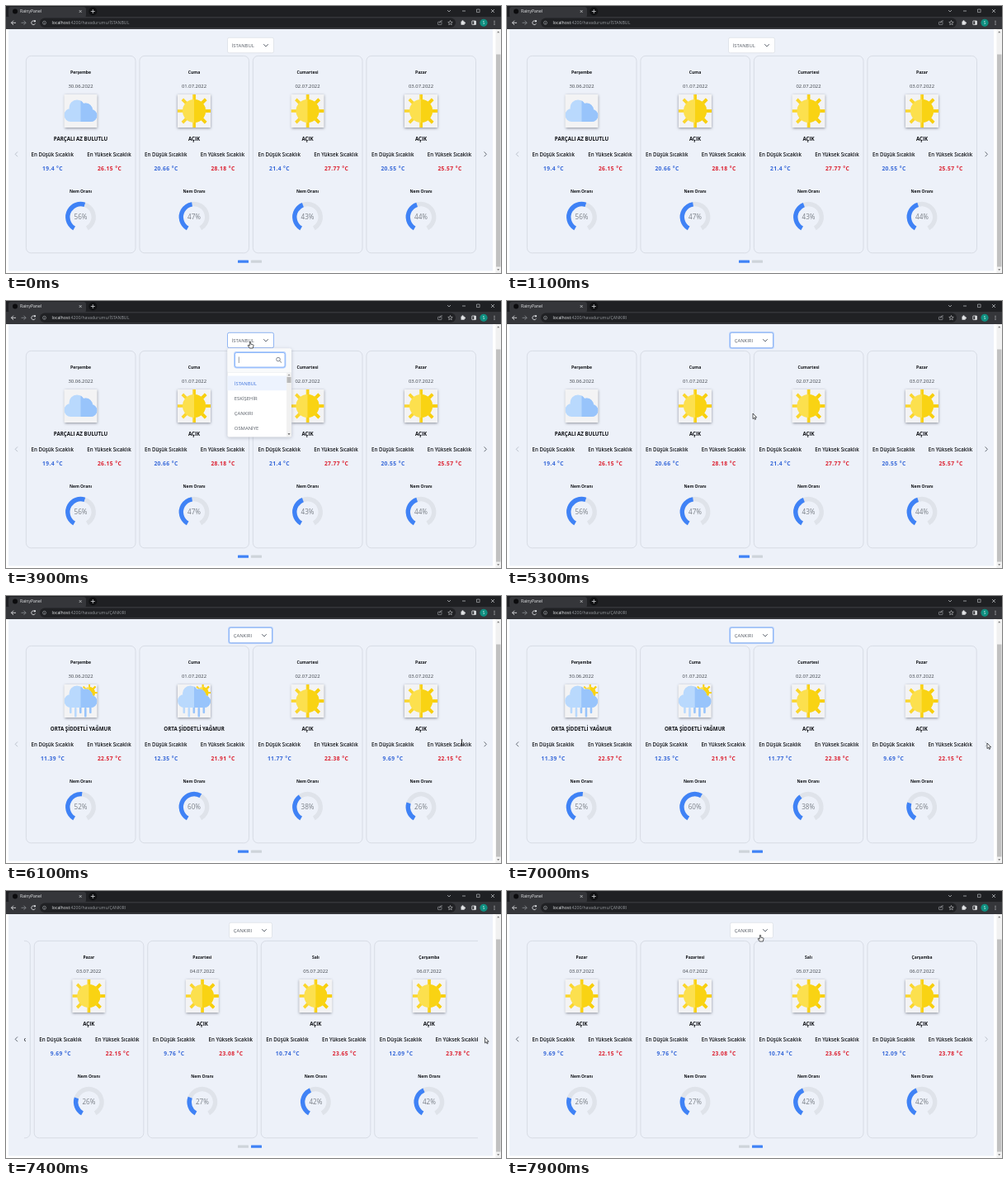
Animation of 600 by 323 pixels, one loop 8 s. Source, as an HTML page with a canvas:

```html
<!DOCTYPE html>
<html lang="tr">
<head>
<meta charset="utf-8">
<title>RainyPanel</title>
<style>
html, body { margin: 0; width: 100%; height: 100%; overflow: hidden; background: #fff; }
canvas { display: block; width: 600px; height: 323px; }
</style>
</head>
<body>
<canvas id="stage"></canvas>
<script>
const W = 600, H = 323, LOOP = 8000;
const OPEN = 3780, PICK = 4900, LOADED = 5400, NEXT = 7000;
const FONT = '"Open Sans", "Noto Sans", sans-serif';
const BLUE = '#3f82f6', PAGE = '#edf1f9', INK = '#101216';
const STEP = 137.5;

const canvas = document.getElementById('stage');
const c = canvas.getContext('2d');
const dpr = window.devicePixelRatio || 1;
canvas.width = W * dpr;
canvas.height = H * dpr;

const days = ['Perşembe', 'Cuma', 'Cumartesi', 'Pazar', 'Pazartesi', 'Salı', 'Çarşamba'];
const dates = ['30.06', '01.07', '02.07', '03.07', '04.07', '05.07', '06.07'];
const labels = { cloud: 'PARÇALI AZ BULUTLU', sun: 'AÇIK', rain: 'ORTA ŞİDDETLİ YAĞMUR' };
const forecasts = {
  'İSTANBUL': [
    ['cloud', 19.4, 26.15, 56], ['sun', 20.66, 28.18, 47],
    ['sun', 21.4, 27.77, 43], ['sun', 20.55, 25.57, 44]
  ],
  'ÇANKIRI': [
    ['rain', 11.39, 22.57, 52], ['rain', 12.35, 21.91, 60], ['sun', 11.77, 22.38, 38],
    ['sun', 9.69, 22.15, 26], ['sun', 9.76, 23.08, 27], ['sun', 10.74, 23.65, 42],
    ['sun', 12.09, 23.78, 42]
  ]
};

const clamp = v => Math.max(0, Math.min(1, v));
const ramp = (t, from, length) => clamp((t - from) / length);
const smooth = u => u * u * (3 - 2 * u);
const easeOut = u => 1 - Math.pow(1 - u, 2.3);

// CSS "ease": cubic-bezier(.25, .1, .25, 1)
function cssEase(x) {
  const curve = (s, a, b) => 3 * a * s * (1 - s) ** 2 + 3 * b * s * s * (1 - s) + s ** 3;
  let lo = 0, hi = 1;
  for (let i = 0; i < 20; i++) {
    const mid = (lo + hi) / 2;
    if (curve(mid, .25, .25) < x) lo = mid; else hi = mid;
  }
  return curve(lo, .1, 1);
}

function rect(x, y, w, h, fill, r = 0) {
  c.fillStyle = fill;
  c.beginPath();
  c.roundRect(x, y, w, h, r);
  c.fill();
}

function frame(x, y, w, h, color, width, r) {
  c.strokeStyle = color;
  c.lineWidth = width;
  c.beginPath();
  c.roundRect(x, y, w, h, r);
  c.stroke();
}

function disc(x, y, r, fill) {
  c.fillStyle = fill;
  c.beginPath();
  c.arc(x, y, r, 0, Math.PI * 2);
  c.fill();
}

function ring(x, y, r, color, width, from = 0, to = Math.PI * 2) {
  c.strokeStyle = color;
  c.lineWidth = width;
  c.beginPath();
  c.arc(x, y, r, from, to);
  c.stroke();
}

function line(color, width, ...pts) {
  c.strokeStyle = color;
  c.lineWidth = width;
  c.beginPath();
  for (let i = 0; i < pts.length; i += 2) c.lineTo(pts[i], pts[i + 1]);
  c.stroke();
}

// y is the middle of the capitals
function text(str, x, y, size, color, align = 'center', weight = 400, spacing = 0) {
  c.font = `${weight} ${size}px ${FONT}`;
  c.letterSpacing = spacing + 'px';
  c.textAlign = align;
  c.fillStyle = color;
  c.fillText(str, x, y + size * .36);
}

function drawBrowser(city) {
  rect(0, 0, W, 13, '#1f2023');
  rect(3, 1, 94, 13, '#35363a', 3);
  rect(0, 13, W, 15, '#35363a');
  disc(11, 6.5, 3, '#0c0c0e');
  text('RainyPanel', 17, 6.6, 5.1, '#e6e7e9', 'left');
  line('#d0d2d5', .7, 88.7, 5, 91.7, 8);
  line('#d0d2d5', .7, 91.7, 5, 88.7, 8);
  disc(105.3, 6.5, 5, '#101113');
  line('#d0d2d5', .8, 102.8, 6.5, 107.8, 6.5);
  line('#d0d2d5', .8, 105.3, 4, 105.3, 9);

  line('#c8cacd', .7, 535, 5, 537, 7, 539, 5);
  line('#c8cacd', .7, 553, 6, 557, 6);
  frame(570.5, 4, 3.6, 3.6, '#c8cacd', .6, 0);
  line('#c8cacd', .7, 588, 4, 592, 8);
  line('#c8cacd', .7, 592, 4, 588, 8);

  line('#d8dadd', .9, 12, 20.3, 6.5, 20.3);
  line('#d8dadd', .9, 9, 17.7, 6.4, 20.3, 9, 22.9);
  line('#84878c', .9, 18.5, 20.3, 24, 20.3);
  line('#84878c', .9, 21.5, 17.7, 24.1, 20.3, 21.5, 22.9);
  ring(33.2, 20.3, 2.4, '#d8dadd', .9, .4, 5.5);
  rect(34, 17.3, 2, 2, '#d8dadd');

  rect(41, 14.5, 504, 11.5, '#202124', 5.75);
  ring(46.5, 20.3, 2, '#aeb1b5', .6);
  line('#aeb1b5', .6, 46.5, 19.9, 46.5, 21.4);
  text('localhost', 55.5, 20.2, 5.2, '#eceef0', 'left');
  const start = 55.5 + c.measureText('localhost').width;
  text(':4200/havadurumu/' + city, start, 20.2, 5.2, '#969a9f', 'left');

  frame(523.5, 19.2, 4.5, 3.4, '#a2a5a9', .6, .5);
  line('#a2a5a9', .7, 525.5, 20.8, 526.5, 18.3, 529, 17.8);
  c.beginPath();
  for (let i = 0; i < 10; i++) {
    const a = -Math.PI / 2 + i * Math.PI / 5, r = i % 2 ? 1.3 : 2.9;
    c.lineTo(538.5 + r * Math.cos(a), 20.4 + r * Math.sin(a));
  }
  c.closePath();
  c.strokeStyle = '#c4c7ca';
  c.lineWidth = .6;
  c.stroke();
  rect(551.5, 18.5, 4.2, 4.2, '#e2e4e6', .5);
  disc(553.5, 18.2, 1, '#e2e4e6');
  disc(556, 20.6, 1, '#e2e4e6');
  frame(564.8, 18, 4.6, 4.6, '#e2e4e6', .8, .4);
  rect(567.3, 18, 2.2, 4.6, '#e2e4e6');
  disc(579, 20.3, 4.6, '#0f8f80');
  text('S', 579, 20.3, 4.8, '#e6f4f2');
  for (let i = -1; i < 2; i++) disc(592, 20.3 + i * 2, .6, '#d8dadd');
}

function drawPage() {
  rect(0, 28, W, H - 28, '#fff');
  rect(3, 28, 587, 292.5, PAGE);
  rect(593.5, 28, 6.5, H - 28, '#f1f1f1');
  rect(594, 58.5, 5.5, 257, '#c1c1c1');
  for (const [y, d, color] of [[31.5, -1, '#6b6b6b'], [319, 1, '#6b6b6b']]) arrowHead(596.7, y, d, color);
}

function arrowHead(x, y, dir, color) {
  c.fillStyle = color;
  c.beginPath();
  c.moveTo(x - 1.5, y - dir * .8);
  c.lineTo(x + 1.5, y - dir * .8);
  c.lineTo(x, y + dir * .9);
  c.fill();
}

// Fills the same shape in two tones, split at x
function twoTone(path, x, left, right) {
  c.fillStyle = left;
  c.fill(path);
  c.save();
  c.beginPath();
  c.rect(x, -30, 60, 60);
  c.clip();
  c.fillStyle = right;
  c.fill(path);
  c.restore();
}

function drawSun(r, ray, width) {
  const path = new Path2D();
  for (let i = 0; i < 8; i++) {
    const m = new DOMMatrix().rotate(i * 45), bar = new Path2D();
    bar.rect(-width / 2, -ray, width, ray);
    path.addPath(bar, m);
  }
  twoTone(path, 0, '#fbd62c', '#f8cf0a');
  const body = new Path2D();
  body.arc(0, 0, r, 0, Math.PI * 2);
  twoTone(body, 0, '#fce04e', '#f9d313');
}

function drawCloud(y) {
  const path = new Path2D();
  for (const [cx, cy, r] of [[-12, 5, 8], [-4.5, -4, 9.5], [6, -1, 8.5], [12.5, 5.5, 7.5]]) {
    path.moveTo(cx + r, cy + y);
    path.arc(cx, cy + y, r, 0, Math.PI * 2);
  }
  path.rect(-12, y + 1, 24.5, 12);
  twoTone(path, 0, '#b9d9fd', '#98c4fb');
}

function drawIcon(kind, cx) {
  c.save();
  c.shadowColor = 'rgba(40,45,60,.5)';
  c.shadowBlur = 3 * dpr;
  c.shadowOffsetY = 1 * dpr;
  rect(cx - 20, 107, 40, 40, '#f3f3f4');
  c.restore();
  c.save();
  c.beginPath();
  c.rect(cx - 20, 107, 40, 40);
  c.clip();
  c.translate(cx, 127);
  if (kind === 'sun') drawSun(14, 20, 3.6);
  if (kind === 'cloud') drawCloud(0);
  if (kind === 'rain') {
    c.save();
    c.translate(10.5, -10);
    drawSun(7, 10.5, 2);
    c.restore();
    for (let i = 0; i < 5; i++) {
      rect(-13.5 + i * 6, i % 2 ? 8 : 6, 2.6, i % 2 ? 11.5 : 9, i < 2 ? '#b9d9fd' : '#98c4fb', 1);
    }
    drawCloud(-5);
  }
  c.restore();
}

function drawKnob(cx, value) {
  const from = Math.PI * 2 / 3, sweep = Math.PI * 5 / 3;
  ring(cx, 255.3, 15.7, '#dfe3ea', 5.4, from, from + sweep);
  ring(cx, 255.3, 15.7, BLUE, 5.4, from, from + sweep * value / 100);
  text(value + '%', cx, 255.4, 8.1, '#7b8088');
}

function drawCard(i, x, [kind, low, high, wet]) {
  const cx = x + 66.5;
  frame(x + .4, 60.4, 132.6, 238.4, '#d5dae2', .9, 6);
  text(days[i], cx, 80.2, 5, INK, 'center', 700);
  text(dates[i] + '.2022', cx, 97, 5.9, '#3c4047');
  drawIcon(kind, cx);
  text(labels[kind], cx, 161, 6.2, INK, 'center', 700);
  text('En Düşük Sıcaklık', cx - 34.3, 179.4, 6.15, INK, 'center', 600);
  text('En Yüksek Sıcaklık', cx + 34.5, 179.4, 6.15, INK, 'center', 600);
  text(low + ' °C', cx - 34, 197, 6.7, '#3567d8', 'center', 700, .4);
  text(high + ' °C', cx + 35, 197, 6.7, '#dc2030', 'center', 700, .4);
  text('Nem Oranı', cx, 223.7, 5, INK, 'center', 700);
  drawKnob(cx, wet);
}

function drawCarousel(t) {
  const cards = forecasts[t < LOADED ? 'İSTANBUL' : 'ÇANKIRI'];
  const shift = 3 * STEP * cssEase(ramp(t, NEXT, 500));
  c.save();
  c.beginPath();
  c.rect(22, 58, 550, 243);
  c.clip();
  cards.forEach((card, i) => {
    const x = 24 + i * STEP - shift;
    if (x > -134 && x < 573) drawCard(i, x, card);
  });
  c.restore();

  const second = t >= NEXT;
  line(second ? '#656c76' : '#bcc2cc', 1, 14, 176.4, 11.2, 179.3, 14, 182.2);
  line(second ? '#bcc2cc' : '#656c76', 1, 579.6, 176.4, 582.4, 179.3, 579.6, 182.2);
  rect(281, 307.6, 13, 3.2, second ? '#ced4da' : BLUE, .4);
  rect(297, 307.6, 13, 3.2, second ? BLUE : '#ced4da', .4);
}

function drawSelect(t, city) {
  const wide = city === 'İSTANBUL', x = wide ? 268.5 : 270.5, w = wide ? 56 : 52;
  const focus = ramp(t, PICK, 100) * (1 - ramp(t, NEXT, 150));
  const hover = ramp(t, 2700, 200) * (1 - ramp(t, NEXT, 150));
  c.globalAlpha = focus;
  frame(x - .6, 37.7, w + 1.2, 19.6, '#b4d0fd', 1.6, 2.5);
  c.globalAlpha = 1;
  rect(x, 38.3, w, 18.4, '#fff', 2);
  frame(x, 38.3, w, 18.4, '#d3d8df', .6, 2);
  c.globalAlpha = hover;
  frame(x, 38.3, w, 18.4, '#6fa2f8', .7, 2);
  c.globalAlpha = 1;
  text(city, x + 5.2, 47.6, 5.9, '#555b64', 'left');
  const right = x + w - 9.5;
  line('#656c76', 1, right - 2.8, 46.2, right, 49, right + 2.8, 46.2);
}

function drawPanel(t) {
  const shown = smooth(ramp(t, OPEN, 120)) * (1 - ramp(t, PICK, 100));
  if (!shown) return;
  c.save();
  c.globalAlpha = shown;
  if (t < PICK) {
    c.translate(0, 57.5);
    c.scale(1, .8 + .2 * shown);
    c.translate(0, -57.5);
  }
  c.save();
  c.shadowColor = 'rgba(30,40,60,.25)';
  c.shadowBlur = 4 * dpr;
  c.shadowOffsetY = dpr;
  rect(268.5, 57.5, 77.5, 107, '#fff', 2);
  c.restore();
  rect(268.5, 57.5, 77.5, 29, '#f9fafb', 2);
  line('#e3e6ea', .5, 268.5, 86.5, 346, 86.5);

  frame(277, 62, 61.5, 18.5, '#b4d0fd', 1.8, 2.5);
  rect(277.5, 62.5, 60.5, 17.5, '#fff', 2);
  frame(277.5, 62.5, 60.5, 17.5, '#5f98f7', .6, 2);
  line('#555b64', .6, 282.3, 67.5, 282.3, 75);
  ring(330, 70.6, 2.3, '#656c76', .8);
  line('#656c76', .9, 331.7, 72.3, 334, 74.6);

  const over = t > 4150 ? Math.floor((cursorAt(t)[1] - 90.5) / 18) : -1;
  ['İSTANBUL', 'ESKİŞEHİR', 'ÇANKIRI', 'OSMANİYE'].forEach((name, i) => {
    const y = 90.5 + i * 18;
    if (!i) rect(268.5, y, 71.5, 17.8, '#edf3fe');
    else if (i === over) rect(268.5, y, 71.5, 17.8, '#eceff2');
    text(name, 276.8, y + 9, 5.9, i ? '#555b64' : '#3c72dd', 'left');
  });
  rect(340, 87, 6, 77, '#f1f1f1');
  rect(340.5, 92, 5, 7, '#b9b9b9');
  arrowHead(343, 89.5, -1, '#8a8a8a');
  arrowHead(343, 161, 1, '#505050');
  c.restore();
}

// [start, end, x0, y0, x1, y1, easing]
const moves = [
  [1650, 2200, 300, -14, 293.5, 65.5, smooth],
  [2400, 3000, 293.5, 65.5, 296, 49, smooth],
  [4000, 4600, 296, 49, 298, 136, smooth],
  [5600, 6400, 298, 136, 582, 182, easeOut],
  [6500, 6800, 582, 182, 582, 178, smooth],
  [7380, 7880, 582, 178, 307, 53, smooth]
];

function cursorAt(t) {
  const [from, to, x0, y0, x1, y1, ease] = moves.filter(m => m[0] <= t).pop() || moves[0];
  const u = ease(ramp(t, from, to - from));
  return [x0 + (x1 - x0) * u, y0 + (y1 - y0) * u];
}

const arrow = new Path2D('M0 0V6.6L1.5 5.2L2.6 7.5L3.6 7L2.6 4.8H4.6Z');
const hand = new Path2D('M-.7 .6Q0 -.5 .7 .6V3.2L3.6 3.9Q4.1 4.1 4 5L3.3 8H-.8L-2.8 5Q-2.7 4 -1.9 4.4L-.7 5.3Z');

function drawCursor(t) {
  if (t < moves[0][0]) return;
  const [x, y] = cursorAt(t);
  const onSelect = x > 268 && x < 325 && y > 38 && y < 57;
  const onList = t > OPEN && t < PICK && y > 90;
  const onNext = x > 574 && t < NEXT;
  if (x > 515 && x < 565 && y > 174 && y < 184 && t < NEXT) {
    line('#111', .9, x, y - 3.5, x, y + 3.5);
    line('#111', .5, x - 1, y - 3.5, x + 1, y - 3.5);
    line('#111', .5, x - 1, y + 3.5, x + 1, y + 3.5);
    return;
  }
  c.save();
  c.translate(x, y);
  const shape = onSelect || onList || onNext ? hand : arrow;
  c.fillStyle = '#fff';
  c.strokeStyle = '#15171a';
  c.lineWidth = .7;
  c.fill(shape);
  c.stroke(shape);
  c.restore();
}

function draw(t) {
  const city = t < PICK ? 'İSTANBUL' : 'ÇANKIRI';
  c.setTransform(dpr, 0, 0, dpr, 0, 0);
  drawPage();
  drawBrowser(city);
  drawCarousel(t);
  drawSelect(t, city);
  drawPanel(t);
  drawCursor(t);
}

const begin = performance.now();
function tick() {
  draw((performance.now() - begin) % LOOP);
  requestAnimationFrame(tick);
}
tick();
</script>
</body>
</html>
```
